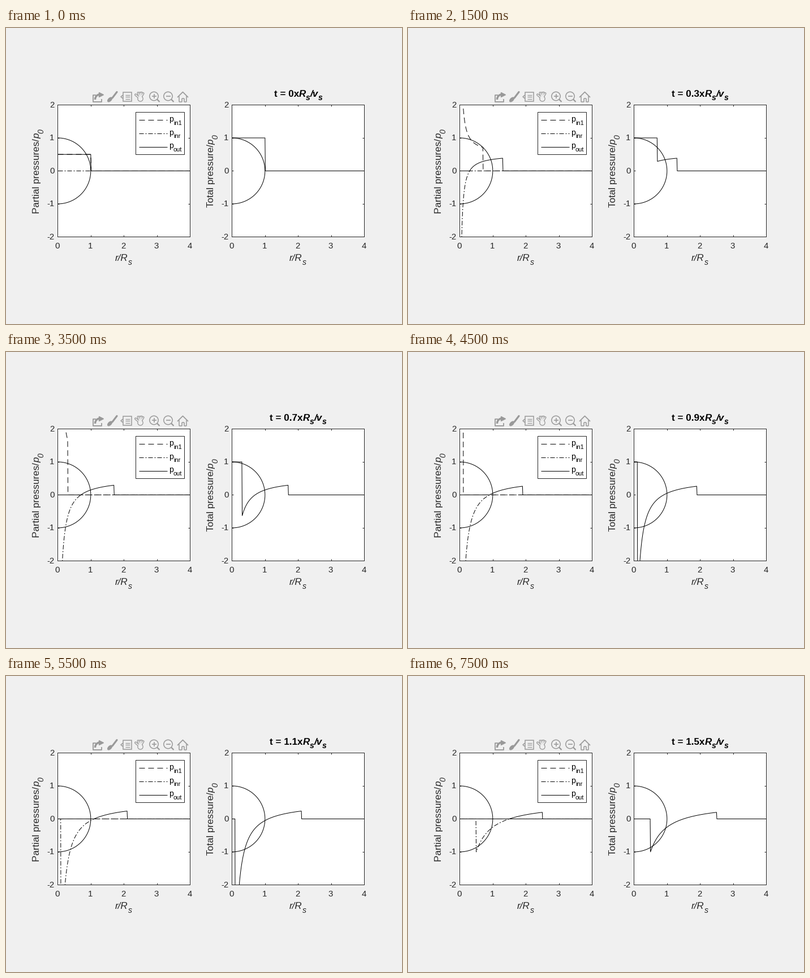
A matplotlib script that plays this animation: 700x525 px, repeating every 8000 ms.

```python
import numpy as np
import matplotlib.pyplot as plt
from matplotlib.animation import FuncAnimation
from matplotlib.patches import Circle, Ellipse, Rectangle
from matplotlib.textpath import text_to_path

W, H = 700, 525
PX = 0.72  # points per pixel at 100 dpi
FRAMES, STEP_MS = 16, 500
DARK, ICON, BACK = "#262626", "#999999", "#f0f0f0"
TICK, LABEL, KEY = 15, 17, 14  # font sizes in pixels
SIDE, TOP = 233.5, 136.45  # plot box; just under .5 so edges snap cleanly
DASH = (0, (10 * PX, 6 * PX))
DASHDOT = (0, (8 * PX, 3 * PX, 2 * PX, 3 * PX))
EPS = 1e-9

plt.rcParams["font.family"] = "Liberation Sans"
plt.rcParams["lines.scale_dashes"] = False
plt.rcParams["lines.dash_capstyle"] = "butt"

fig = plt.figure(figsize=(W / 100, H / 100), dpi=100, facecolor=BACK)

# Overlay in pixel coordinates, y pointing down
ui = fig.add_axes([0, 0, 1, 1], zorder=5)
ui.set(xlim=(0, W), ylim=(H, 0))
ui.axis("off")


def advance(text):
    prop = text.get_fontproperties()

    def ink(s):
        return text_to_path.get_text_width_height_descent(s, prop, False)[0]

    return (ink("|" + text.get_text() + "|") - ink("||")) / PX


def rich(x, y, parts, size, color="black", weight="normal", anchor=0.5, up=False):
    """Lay out (string, style) parts on a line; style: i = italic, _ = subscript."""
    texts = []
    for string, style in parts:
        height = round(0.8 * size) if "_" in style else size
        texts.append(ui.text(0, 0, string, fontsize=height * PX, color=color,
                             weight=weight, style="italic" if "i" in style else "normal",
                             rotation=90 if up else 0, rotation_mode="anchor",
                             ha="left", va="baseline"))
    widths = [advance(t) for t in texts]
    pos = -anchor * sum(widths)
    for t, w, (_, style) in zip(texts, widths, parts):
        drop = 0.4 * size if "_" in style else 0
        t.set_position((x + drop, y - pos) if up else (x + pos, y + drop))
        pos += w
    return texts


def stroke(xs, ys, lw=1.0, color=ICON, cap="butt", **kw):
    ui.plot(xs, ys, color=color, lw=lw * PX, solid_capstyle=cap, **kw)


def panel(x0, ylabel):
    ax = fig.add_axes([x0 / W, 1 - (TOP + SIDE + 0.5) / H, SIDE / W, (SIDE + 0.5) / H])
    ax.set(xlim=(0, 4), ylim=(-2, 2), xticks=range(5), yticks=range(-2, 3))
    ax.tick_params(direction="in", top=True, right=True, length=2.6 * PX,
                   width=PX, color=DARK, labelbottom=False, labelleft=False)
    for spine in ax.spines.values():
        spine.set(linewidth=PX, color=DARK)
    for i in range(5):
        shift = SIDE * i / 4
        rich(x0 - 0.5 + shift, 391.3, [(str(i), "")], TICK, DARK)
        rich(x0 - 6, TOP + 4.6 + shift, [(str(2 - i), "")], TICK, DARK, anchor=1)
    rich(x0 + SIDE / 2 - 0.3, 412.7, [("r/R", "i"), ("s", "i_")], LABEL, DARK)
    rich(x0 - 32.2, 254, [(ylabel, ""), ("p", "i"), ("0", "i_")], LABEL, DARK, up=True)
    a = np.linspace(-np.pi / 2, np.pi / 2, 200)
    ax.plot(np.cos(a), np.sin(a), color="black", lw=PX)
    return ax


def curve(ax, ls="-"):
    return ax.plot([], [], color="black", lw=PX, ls=ls)[0]


def legend():
    ui.add_patch(Rectangle((229.45, 149.45), 86, 75, fc="white", ec=DARK, lw=PX))
    for i, (sub, ls) in enumerate((("in1", DASH), ("inr", DASHDOT), ("out", "-"))):
        y = 163.45 + 23.6 * i
        stroke([235, 285], [y, y], color="black", ls=ls)
        rich(288, y + 2.8, [("p", ""), (sub, "_")], KEY, anchor=0)


def export_icon(x, y):
    s = np.linspace(0, np.pi / 2, 20)
    stroke(x + np.array([-3, -8, -8, 7, 7]), y + np.array([-3, -3, 9, 9, 4]), 1.8)
    stroke(x + 4 - 8 * np.cos(s), y + 5 - 9 * np.sin(s), 3.4)
    stroke([x + 6.5], [y - 4], marker=">", markersize=8 * PX)


def brush_icon(x, y):
    stroke([x + 8, x], [y - 8.5, y + 2], 3.2, cap="round")
    ui.add_patch(Ellipse((x - 4.5, y + 5), 11, 6.5, angle=-45, fc=ICON, ec="none"))


def note_icon(x, y):
    ui.add_patch(Rectangle((x - 6, y - 8), 15, 16, fc="none", ec=ICON, lw=1.5 * PX))
    stroke([x - 6, x - 9.5, x - 6], [y - 3, y, y + 3], 1.5)
    for dy in (-3.5, 0, 3.5):
        stroke([x - 2, x + 6], [y + dy, y + dy], 1.3)


def hand_icon(x, y):
    # a wide grey pass, then a narrow pass in the background colour leaves an outline
    for color, grow in ((ICON, 1.3), (BACK, 0)):
        for a in np.radians([-52, -20, 0, 16, 33]):
            stroke([x, x + 10 * np.sin(a)], [y + 3, y + 2.5 - 10 * np.cos(a)],
                   1.6 + 2 * grow, color, "round")
        ui.add_patch(Circle((x + 0.5, y + 3.5), 4 + grow, fc=color, ec="none", zorder=2))


def zoom_icon(x, y, plus):
    ui.add_patch(Circle((x, y - 1), 7.7, fc="none", ec=ICON, lw=1.5 * PX))
    stroke([x + 5.6, x + 10], [y + 4.6, y + 9], 2.2)
    stroke([x - 4, x + 4], [y - 1, y - 1], 1.6)
    if plus:
        stroke([x, x], [y - 5, y + 3], 1.6)


def home_icon(x, y):
    stroke([x - 9.5, x, x + 9.5], [y + 1, y - 8.5, y + 1], 1.7)
    for half, top in ((6.5, -1), (2, 2.5)):
        for side in (-half, half):
            stroke([x + side, x + side], [y + top, y + 8.5], 1.5)
    for side in (-1, 1):
        stroke([x + 2 * side, x + 6.5 * side], [y + 8.5, y + 8.5], 1.5)
    stroke([x - 2, x + 2], [y + 2.5, y + 2.5], 1.5)


def toolbar(y=122):
    export_icon(161.5, y)
    brush_icon(188, y)
    note_icon(212.5, y)
    hand_icon(237, y)
    zoom_icon(261.5, y, True)
    zoom_icon(286.5, y, False)
    home_icon(312.5, y)


left = panel(91.45, "Partial pressures/")
right = panel(399.45, "Total pressure/")
inward, reflected, outward = curve(left, DASH), curve(left, DASHDOT), curve(left)
total = curve(right)
legend()
toolbar()

r = np.linspace(0, 4, 401)
r[0] = 1e-3  # keep clear of the pole at the centre
title = []


def update(k):
    t = k / 10
    converging = 0.5 * (1 + t / r)
    diverging = 0.5 * (1 - t / r)
    p_in = np.where(r <= 1 - t + EPS, converging, 0)
    p_ref = np.where((r >= t - 1 - EPS) & (r < t - EPS), diverging, 0)
    p_out = np.where((r >= t - EPS) & (r <= 1 + t + EPS), diverging, 0)
    for line, p in ((inward, p_in), (reflected, p_ref), (outward, p_out),
                    (total, p_in + p_ref + p_out)):
        line.set_data(r, p)

    while title:
        title.pop().remove()
    title.extend(rich(516.5, 121.7, [(f"t = {t:g}x", ""), ("R", "i"), ("s", "i_"),
                                     ("/v", "i"), ("s", "i_")], LABEL, weight="bold"))
    return [inward, reflected, outward, total, *title]


anim = FuncAnimation(fig, update, frames=FRAMES, interval=STEP_MS,
                     repeat=True, repeat_delay=0)
plt.show()
```
